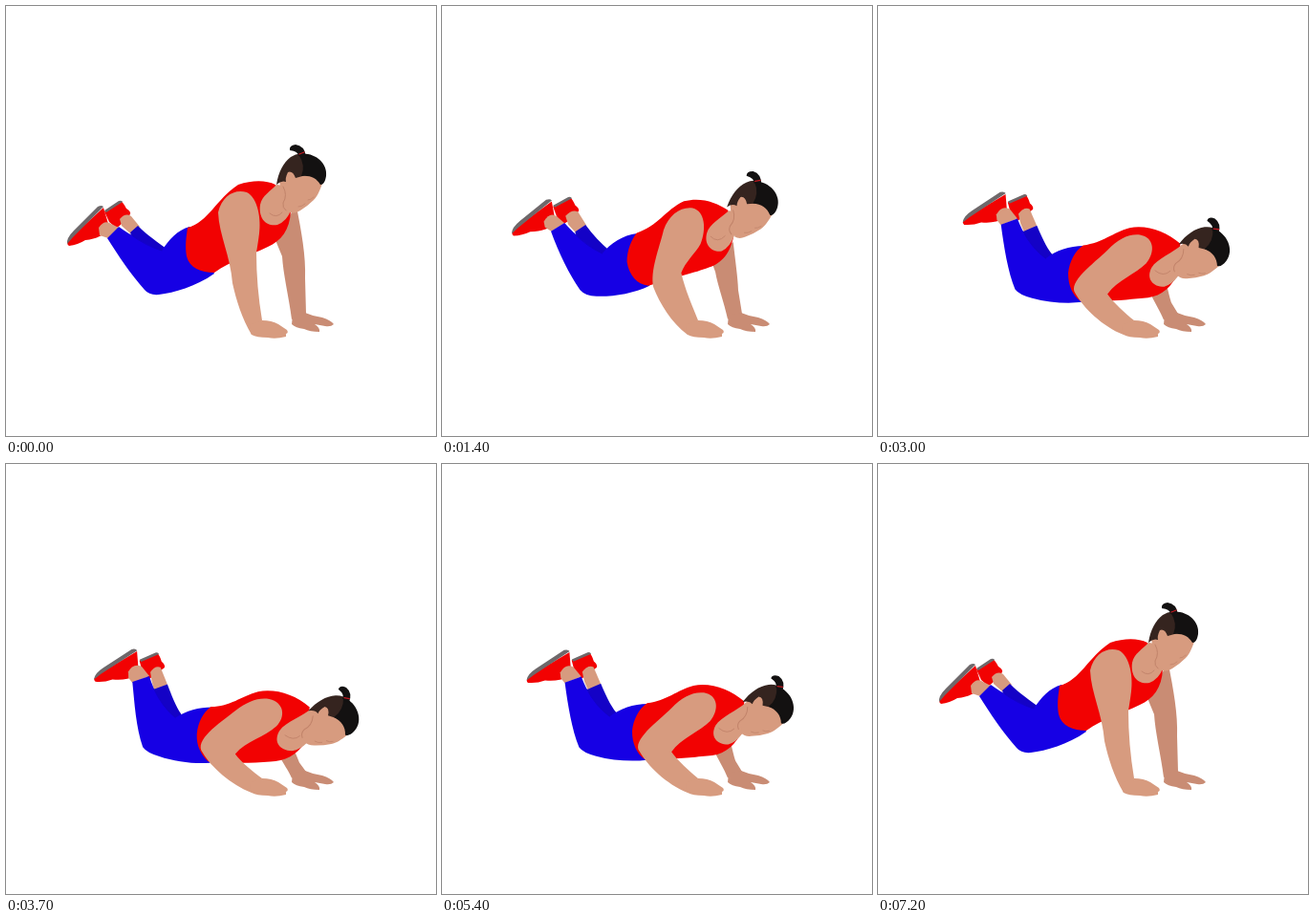
Write an HTML page that moves like this. It is 450x450 px and loops after 7.3 s.

```html
<!DOCTYPE html>
<html lang="en">
<head>
<meta charset="utf-8">
<title>Knee push-up</title>
<style>
html, body { margin: 0; width: 100%; height: 100%; overflow: hidden; background: #fff; }
svg { display: block; width: 100vw; height: 100vh; }
</style>
</head>
<body>
<svg id="stage" viewBox="0 0 450 450"></svg>
<script>
const LOOP = 7300, STEP = 100;
const SKIN = '#d79b7f', SHADE = '#c98c74', LINE = '#c1836a';
const RED = '#f20202', BLUE = '#1600e4', NAVY = '#1402c6', SOLE = '#6e686a';
const BROWN = '#35241f', BLACK = '#131111';
const stage = document.getElementById('stage');
const updates = [];

// Depth of the push-up over time: [ms, 0 = arms straight .. 1 = lowest]
const depthKeys = [
  [0, 0], [800, .075], [1400, .285], [2200, .57], [3000, .81], [4000, .98],
  [4400, 1], [4800, .98], [5600, .73], [6200, .42], [6400, .31], [7200, 0]
];

function slope(i) {
  const a = depthKeys[i - 1], b = depthKeys[i + 1];
  return a && b ? (b[1] - a[1]) / (b[0] - a[0]) : 0;
}

function depth(t) {
  const i = depthKeys.findIndex(k => k[0] > t) - 1;
  if (i < 0) return 0;
  const [t0, v0] = depthKeys[i], [t1, v1] = depthKeys[i + 1];
  const d = t1 - t0, u = (t - t0) / d, w = 1 - u;
  return w * w * (1 + 2 * u) * v0 + u * u * (3 - 2 * u) * v1
    + d * u * w * (w * slope(i) - u * slope(i + 1));
}

// Quadratic blend of the high, middle and low poses
const MID = .57;
function blend(a, b, c, p) {
  return a * (p - MID) * (p - 1) / MID
    + b * p * (p - 1) / (MID * (MID - 1))
    + c * p * (p - MID) / (1 - MID);
}

function add(tag, attrs, parent = stage) {
  const el = document.createElementNS('http://www.w3.org/2000/svg', tag);
  for (const k in attrs) el.setAttribute(k, attrs[k]);
  return parent.appendChild(el);
}

const paint = (color, line) => line
  ? { fill: 'none', stroke: color, 'stroke-width': line, 'stroke-linecap': 'round' }
  : { fill: color };

const shape = (d, color, parent, line) => add('path', { d, ...paint(color, line) }, parent);

// A path that bends between three poses
function morph(color, high, mid, low, line) {
  const el = shape(high, color, stage, line);
  const [a, b, c] = [high, mid, low].map(s => s.match(/\d+/g).map(Number));
  updates.push(p => {
    let i = 0;
    el.setAttribute('d', high.replace(/\d+/g, () => {
      const n = blend(a[i], b[i], c[i], p).toFixed(2);
      i++;
      return n;
    }));
  });
}

// A stiff part carried by a pivot: three poses of [x, y, angle]
function rigid(high, mid, low) {
  const g = add('g', {});
  updates.push(p => {
    const [x, y, r] = high.map((v, i) => blend(v, mid[i], low[i], p));
    g.setAttribute('transform',
      `translate(${x} ${y}) rotate(${r}) translate(${-high[0]} ${-high[1]})`);
  });
  return g;
}

// Far arm
morph(SHADE,
  'M304 210C309 235 314 262 313 285L314 322L299 328C296 305 290 280 289 262Q284 250 280 240Z',
  'M304 275C305 288 307 300 308 306L314 322L299 328C295 315 288 302 285 292Q284 288 282 285Z',
  'M300 300C303 304 306 310 307 313L314 322L299 329C296 322 290 314 287 308Q286 306 284 302Z');
shape('M300 323L313 321Q322 325 331 326Q340 329 343 333Q340 336 334 335L323 333Q329 337 328 341Q318 341 312 338Q303 337 299 333Z', SHADE);

// Far foot and shin
const farShoe = rigid([120, 204, 0], [146, 198, 8], [160, 198, 10]);
shape('M103 215L120 204Q123 206 126 212Q131 215 130 218L124 224Q118 232 115 232L108 226Z', RED, farShoe);
shape('M103 214L118 204Q121 203 122 205L105 216Z', SOLE, farShoe);
morph(SKIN,
  'M119 223Q125 216 131 220L140 231L130 238L121 230Z',
  'M139 218Q146 210 152 213L160 229L148 237L142 228Z',
  'M153 218Q157 211 163 213L170 231L156 237L154 227Z');
morph(NAVY,
  'M138 230C148 240 160 248 168 254L158 266C140 258 134 247 130 237Z',
  'M160 229C166 240 172 250 180 258L168 270C152 260 148 247 147 236Z',
  'M170 231C174 242 178 254 184 263L174 276C160 262 156 248 155 236Z');

// Near foot and leg
const shoe = rigid([98, 210, 0], [122, 198, 10], [135, 194, 12]);
shape('M102 211L105 221L107 228L104 238L98 241Q92 244 83 245Q75 250 66 251Q62 249 67 243Z', RED, shoe);
shape('M96 210Q100 208 102 210L70 242L64 249Q63 243 71 235Z', SOLE, shoe);
morph(SKIN,
  'M97 232Q103 223 110 228L118 232L107 243L98 240Z',
  'M116 221Q122 210 130 215L138 224L122 231L117 226Z',
  'M130 217Q135 208 144 212L152 222L134 229L130 224Z');
morph(BLUE,
  'M118 231C132 241 150 252 163 256C170 245 180 234 192 231L218 280C198 294 176 300 160 302Q150 303 145 297C130 280 118 262 106 243Z',
  'M138 224C146 238 156 252 172 262C182 252 196 246 212 245L216 303C200 307 180 308 162 305Q149 303 144 297C135 280 127 255 122 231Z',
  'M152 222C156 238 166 256 178 266C190 259 202 256 216 256L213 314C196 315 176 312 160 306Q147 302 143 296C136 275 136 250 134 228Z');
morph(NAVY,
  'M130 239Q146 251 163 256',
  'M146 237Q156 252 172 262',
  'M156 235Q164 254 178 266', .8);

// Shirt and chest
morph(RED,
  'M190 232C212 226 220 202 243 187C258 182 272 182 282 187L298 215C297 234 288 246 274 252C254 262 236 266 218 279C204 279 192 274 189 262C187 250 189 240 190 232Z',
  'M212 244C234 238 242 226 260 220C279 216 297 224 311 235L310 265C303 284 292 291 278 293C262 296 246 299 214 303C204 300 198 288 197 274C198 262 204 250 212 244Z',
  'M214 256C234 257 246 246 264 241C282 238 302 243 318 257L313 296C303 308 292 314 276 314C258 315 240 316 211 312C204 304 199 296 200 284C201 272 206 262 214 256Z');
morph(SKIN,
  'M283 187C277 194 268 198 266 208C264 222 272 231 284 229Q294 225 298 214L310 190Z',
  'M312 236C303 244 288 251 284 260C279 272 288 280 298 279Q306 275 311 265L325 240Z',
  'M320 258C313 266 293 272 286 281C279 292 284 302 299 303Q308 302 315 296L335 270Z');
morph(LINE,
  'M276 217Q283 223 289 216',
  'M286 262Q294 270 302 262',
  'M293 287Q302 293 308 288', .9);

// Head, pivoting at the hair tie
const head = rigid([310, 154, 0], [346, 211, 21], [358, 251, 35]);
shape('M286 184L296 172L312 172L331 186C328 194 326 199 322 203Q316 209 308 214Q302 218 297 216Q291 204 286 184Z', SKIN, head);
shape('M290 189Q295 198 290 206Q289 211 293 214', LINE, head, 1);
shape('M316 203Q319 203 322 200M306 210Q310 210 313 207', LINE, head, .7);
shape('M283 187C285 174 290 164 298 158Q305 153 312 155L314 177L303 180Q300 172 295 174Q292 180 293 184Q288 182 283 187Z', BROWN, head);
shape('M306 155C322 152 337 164 335 178C334 184 332 187 329 187C325 180 318 177 309 178Q314 167 306 155Z', BLACK, head);
shape('M306 157Q306 152 297 151Q296 146 303 145Q312 146 314 157Z', BLACK, head);
shape('M307 155L312 153', '#c01820', head, 1.3);

// Near arm
morph(SKIN,
  'M222 216C226 198 240 191 252 195C264 201 267 224 265 238C264 246 263 252 262 258C262 282 264 305 268 329L257 344C247 327 241 308 237 290C235 262 223 240 222 216Z',
  'M238 248C246 234 258 226 270 227C284 229 285 246 276 260C268 270 250 280 243 294C249 306 260 319 268 329L257 344C236 334 219 314 211 298C205 286 228 264 238 248Z',
  'M240 259C254 250 264 247 276 249C292 253 294 268 284 277C272 288 252 291 240 304C246 312 258 322 268 329L257 344C236 336 214 317 206 303C195 289 222 272 240 259Z');
shape('M268 329Q278 329 285 333L294 339Q296 342 293 343L293 346Q282 349 274 347Q262 347 257 344Q254 336 256 333Z', SKIN);

function draw(now) {
  const t = Math.floor((now % LOOP) / STEP) * STEP;
  const p = depth(t);
  updates.forEach(f => f(p));
}

const start = performance.now();
function tick() {
  draw(performance.now() - start);
  requestAnimationFrame(tick);
}
tick();
</script>
</body>
</html>
```
